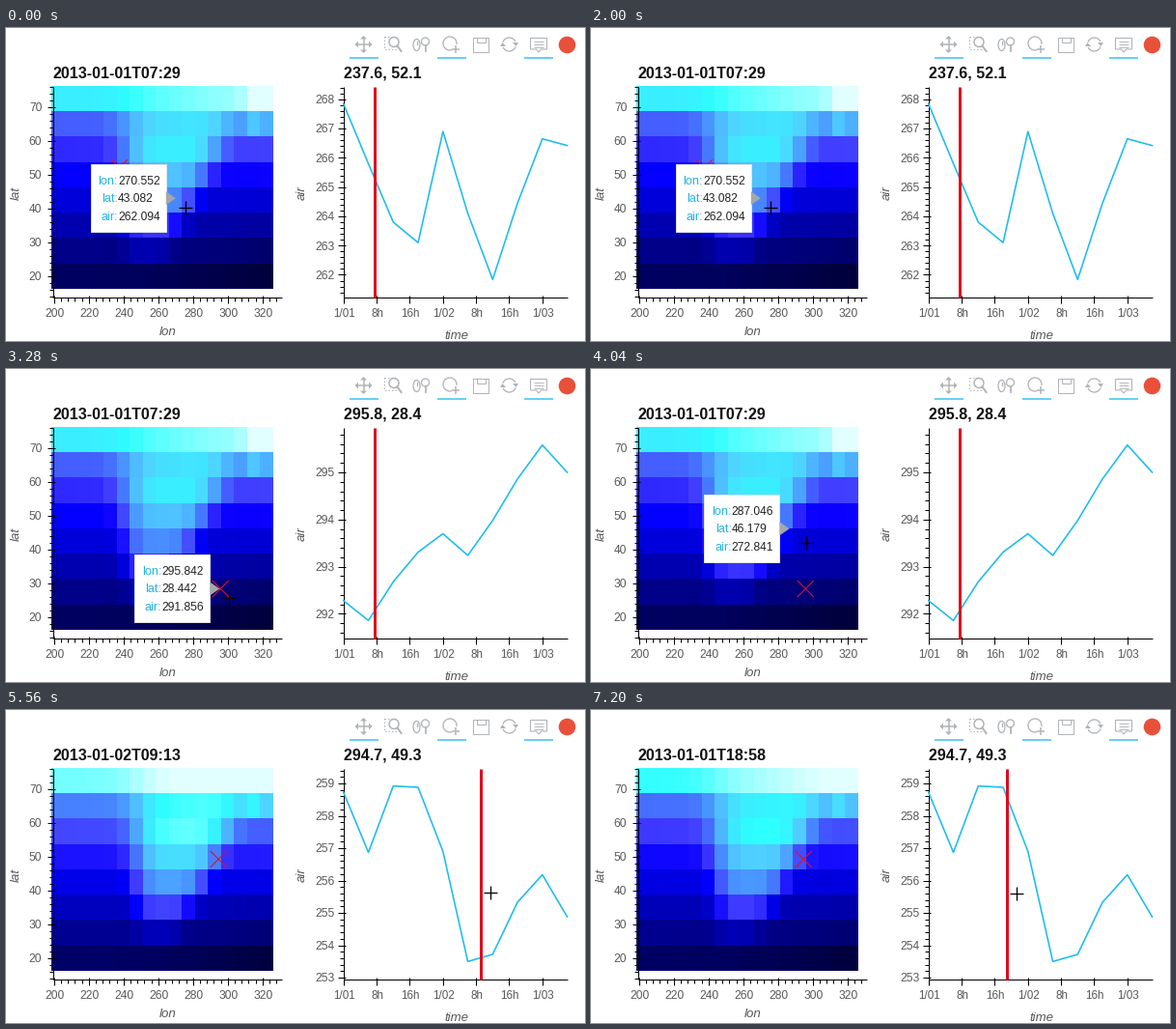
Write a matplotlib script that moves like this. It is 600 px wide and 324 px high and loops after 7.28 s.

```python
import numpy as np
import matplotlib.pyplot as plt
from matplotlib.animation import FuncAnimation
from matplotlib.collections import LineCollection
from matplotlib.patches import Arc, Circle, Ellipse, Polygon, Rectangle

W, H, DPI = 600, 324, 100
STEP, FRAMES = 40, 182
PX = 72 / DPI
TOP, BOTTOM = 60.5, 278.5
LEFT_AXIS, RIGHT_AXIS = 48.5, 349.5
CYAN, GREY, INK = "#1cbcee", "#b0b4b7", "#585858"

plt.rcParams["font.family"] = "Liberation Sans"
fig = plt.figure(figsize=(W / DPI, H / DPI), dpi=DPI, facecolor="white")
ax = fig.add_axes([0, 0, 1, 1])
ax.axis("off")


def lon_x(lon):
    return 49.8 + (lon - 200) * 1.8


def lat_y(lat):
    return 187 - (lat - 40) * 3.5


def hour_x(hour):
    return 349.8 + hour * 103 / 24


def text(x, y, s, size=12, color=INK, **kw):
    return ax.text(x, y, s, fontsize=size * PX, color=color, **kw)


def line(xs, ys, color="black", width=1.0, **kw):
    return ax.plot(xs, ys, color=color, lw=width * PX, **kw)[0]


def segments(segs, color="black", width=1.0, **kw):
    return ax.add_collection(LineCollection(segs, colors=color, linewidths=width * PX, **kw))


def outline(shape, *args, width=1.3, **kw):
    ax.add_patch(shape(*args, fc="none", ec=GREY, lw=width * PX, **kw))


def y_ticks(x, majors, minors):
    return ([[(x - 6, y), (x + 2, y)] for y in majors]
            + [[(x - 4, y), (x, y)] for y in minors])


def x_ticks(majors, minors):
    return ([[(x, BOTTOM - 2), (x, BOTTOM + 6)] for x in majors]
            + [[(x, BOTTOM), (x, BOTTOM + 4)] for x in minors])


def heat(warmth):
    """Colours of the 8 x 17 map: a north-south slope with a trough of warm air."""
    row, col = np.mgrid[0:8, 0:17]
    slope = 8 + 8.7 * (7 - row) + 18 * np.exp(-3 * row)
    tilt = (col / 16) ** 2 * (9 - 2.5 * row)
    center = 9.6 - 0.45 * row + 0.8 * warmth
    width = 4.8 - 0.5 * row
    trough = 36 * np.exp(-((row - 3.2) / 2.6) ** 4 - ((col - center) / width) ** 4)
    spot = 20 * np.exp(-(row - 0.6) ** 2 / 0.4 - (col - 15.3) ** 2)
    level = slope + tilt + trough + spot + warmth * (7 - 0.8 * row)
    red = np.interp(level, [42, 55, 82, 90, 100], [0, 65, 80, 45, 225])
    green = np.interp(level, [44, 90], [0, 255])
    blue = np.interp(level, [0, 42], [60, 255])
    return np.stack([red, green, blue], -1) / 255


# Time picks: start ms, title, hour, heatmap
TIMES = [(0, "2013-01-01T07:29", 7.483, heat(0)),
         (5240, "2013-01-02T09:13", 33.217, heat(1)),
         (6480, "2013-01-01T18:58", 18.967, heat(0.5))]

# Place picks: start ms, lon, lat, six-hourly air temperature
PLACES = [
    (0, 237.6, 52.1,
     [267.84, 265.8, 263.8, 263.1, 266.9, 264.1, 261.84, 264.45, 266.65, 266.42]),
    (3160, 295.842, 28.442,
     [292.28, 291.86, 292.68, 293.31, 293.7, 293.24, 293.98, 294.86, 295.58, 295.0]),
    (4280, 294.7, 49.3,
     [258.72, 256.87, 258.92, 258.88, 256.9, 253.5, 253.72, 255.33, 256.18, 254.88])]

# Pointer moves: start ms, end ms, lon, lat reached (lon runs on past the map)
START = (270.552, 43.082)
MOVES = [(2320, 2960, 295.842, 28.442), (3360, 3840, 272.2, 50.7),
         (3840, 4040, 291.356, 44.8665), (4040, 4220, 294.7, 49.3),
         (4400, 4800, 432.1, 42.7), (4920, 5160, 446, 42.3),
         (5800, 6320, 412.2, 42.1)]


def pointer(ms):
    pos = np.array(START)
    for begin, end, *goal in MOVES:
        pos = pos + (np.array(goal) - pos) * np.clip((ms - begin) / (end - begin), 0, 1)
    return pos


def current(states, ms):
    return [s for s in states if s[0] <= ms][-1]


def toolbar():
    # pan
    x, y = 370.5, 17
    segments([[(x - 7, y), (x + 7, y)], [(x, y - 7), (x, y + 7)]], GREY, 1.5)
    for dx, dy in ((1, 0), (-1, 0), (0, 1), (0, -1)):
        tip, base = 9, 5.5
        ax.add_patch(Polygon([(x + dx * tip, y + dy * tip),
                              (x + dx * base - dy * 3.5, y + dy * base + dx * 3.5),
                              (x + dx * base + dy * 3.5, y + dy * base - dx * 3.5)],
                             fc=GREY, lw=0))
    # box zoom
    outline(Rectangle, (392, 9), 12, 13, width=1, ls=(0, (1.5, 2)))
    ax.add_patch(Circle((402, 14.5), 5, fc="white", ec=GREY, lw=1.5 * PX))
    line([405.5, 409.5], [18.5, 24], GREY, 2)
    # wheel zoom
    outline(Ellipse, (425.5, 17.5), 7, 12)
    line([425.5, 425.5], [14, 17], GREY, 1.3)
    outline(Circle, (434.5, 14), 4)
    line([434.5, 434.5], [18, 24], GREY, 1.8)
    # tap
    outline(Circle, (460, 16), 7)
    ax.add_patch(Rectangle((461.5, 17), 10, 9, fc="white", lw=0, zorder=2))
    segments([[(462, 21.5), (470, 21.5)], [(466, 17.5), (466, 25.5)]], GREY, 1.5, zorder=3)
    # save
    outline(Rectangle, (483.5, 9.5), 16, 15, width=1)
    outline(Rectangle, (487.5, 9.5), 9, 5, width=1)
    # reset
    for a, tri in ((200, [(525, 15), (531, 15), (528.5, 19)]),
                   (20, [(512, 19), (518, 19), (514.5, 15)])):
        outline(Arc, (521.5, 17), 14, 14, theta1=a, theta2=a + 135)
        ax.add_patch(Polygon(tri, fc=GREY, lw=0))
    # hover
    outline(Polygon, [(543.5, 10.5), (560.5, 10.5), (560.5, 22), (554.5, 22),
                      (552, 25), (549.5, 22), (543.5, 22)], width=1.1)
    segments([[(547, y), (557, y)] for y in (13.5, 16.5, 19.5)], GREY, 0.9)
    # badge
    ax.add_patch(Circle((581.5, 17.5), 8.8, fc="#e8503a", lw=0))
    segments([[(x, 31.3), (x + 30, 31.3)] for x in (355.5, 446.5, 537)], "#45c4ee", 1.6)


def static_axes():
    segments([[(LEFT_AXIS, TOP), (LEFT_AXIS, BOTTOM)], [(LEFT_AXIS, BOTTOM), (285.5, BOTTOM)],
              [(RIGHT_AXIS, TOP), (RIGHT_AXIS, BOTTOM)], [(RIGHT_AXIS, BOTTOM), (582, BOTTOM)]])
    lons, lats, hours = range(200, 321, 20), range(20, 71, 10), range(0, 49, 8)
    segments(x_ticks([lon_x(v) for v in lons], [lon_x(v) for v in range(200, 329, 4)])
             + x_ticks([hour_x(h) for h in hours], [])
             + y_ticks(LEFT_AXIS, [lat_y(v) for v in lats],
                       [lat_y(v) for v in range(14, 77, 2)]))
    for v in lons:
        text(lon_x(v) + 0.7, 298.7, str(v), ha="center")
    for v in lats:
        text(37.3, lat_y(v) + 4.3, str(v), ha="right")
    for h in hours:
        text(hour_x(h) + 0.5, 299.3, f"{h % 24}h" if h % 24 else f"1/0{h // 24 + 1}",
             size=11.6, ha="center")
    label = dict(size=13.2, style="italic", ha="center")
    text(168, 318, "lon", **label)
    text(467, 321.5, "time", **label)
    text(11, 170.5, "lat", rotation=90, va="center", **label)
    text(307, 170.5, "air", rotation=90, va="center", **label)
    line([249, W], [323.5, 323.5], "#f0f0f0", 1)


toolbar()
static_axes()

image = ax.imshow(TIMES[0][3], extent=(lon_x(198.75) - 0.5, lon_x(326.25) - 0.5, 270, TOP),
                  interpolation="nearest", aspect="auto", zorder=1)
ax.set_xlim(0, W)
ax.set_ylim(H, 0)

title_style = dict(size=16, color="#111111", weight="bold")
map_title = text(48.5, 52, "", **title_style)
plot_title = text(350.5, 52, "", **title_style)
value_ticks = segments([])
value_labels = [text(340.2, 0, "", ha="right") for _ in range(7)]
curve = line([], [], CYAN, 1.6, zorder=3)
marker = segments([], "#d8122c", 1.1, zorder=3)
time_bar = line([], [], "#e00a1e", 3, zorder=4, solid_capstyle="butt")

tip_box = ax.add_patch(Rectangle((0, 0), 78, 70, fc="white", ec="#e2e2e2", lw=PX, zorder=5))
tip_arrow = ax.add_patch(Polygon([(0, 0)] * 3, fc="#a3a8ab", lw=0, zorder=5))
tip_names = [text(0, 0, s, 12.6, "#26b4e1", ha="right", zorder=6) for s in ("lon:", "lat:", "air:")]
tip_values = [text(0, 0, "", 12, "#222222", zorder=6) for _ in range(3)]
cursor = segments([], "black", 1.3, zorder=8)


def draw_place(place):
    _, lon, lat, values = place
    plot_title.set_text(f"{lon:.1f}, {lat:.1f}")

    # the value axis pads the data by a tenth on both sides
    pad = (max(values) - min(values)) / 10
    low, high = min(values) - pad, max(values) + pad

    def to_y(v):
        return BOTTOM - (np.asarray(v) - low) / (high - low) * (BOTTOM - TOP)

    majors = np.arange(np.ceil(low), high)
    minors = np.arange(np.ceil(low * 5), high * 5) / 5
    value_ticks.set_segments(y_ticks(RIGHT_AXIS, to_y(majors), to_y(minors)))
    for i, label in enumerate(value_labels):
        label.set_visible(i < len(majors))
        if i < len(majors):
            label.set_text(f"{majors[i]:.0f}")
            label.set_y(to_y(majors[i]) + 4.3)
    curve.set_data(hour_x(np.arange(len(values)) * 6), to_y(values))
    x, y, r = lon_x(lon), lat_y(lat), 8.5
    marker.set_segments([[(x - r, y - r), (x + r, y + r)], [(x - r, y + r), (x + r, y - r)]])


def draw_tip(lon, lat):
    shown = lon < 326.25
    for part in [tip_box, tip_arrow, *tip_names, *tip_values]:
        part.set_visible(shown)
    if not shown:
        return
    air = 262.094 + 0.780215 * (lon - START[0]) - 0.685135 * (lat - START[1])
    x, y = lon_x(lon), lat_y(lat)
    tip_box.set_xy((x - 89, y - 35))
    tip_arrow.set_xy([(x - 11, y - 7), (x - 1, y), (x - 11, y + 7)])
    for i, v in enumerate((lon, lat, air)):
        base = y + (i - 1) * 18.5 + 4
        tip_names[i].set_position((x - 60.8, base))
        tip_values[i].set_position((x - 60.8, base))
        tip_values[i].set_text(f"{v:.3f}")


def update(i):
    ms = i * STEP
    _, stamp, hour, rgb = current(TIMES, ms)
    image.set_data(rgb)
    map_title.set_text(stamp)
    time_bar.set_data([hour_x(hour)] * 2, [TOP, BOTTOM])
    draw_place(current(PLACES, ms))
    # the tooltip trails the pointer slightly
    draw_tip(*pointer(ms - 45))
    lon, lat = pointer(ms)
    x, y = lon_x(lon) + 9, lat_y(lat) + 10
    cursor.set_segments([[(x - 7, y), (x + 7, y)], [(x, y - 7), (x, y + 7)]])
    return []


anim = FuncAnimation(fig, update, frames=FRAMES, interval=STEP, init_func=lambda: update(0),
                     repeat=True, repeat_delay=0, blit=False)
plt.show()
```
